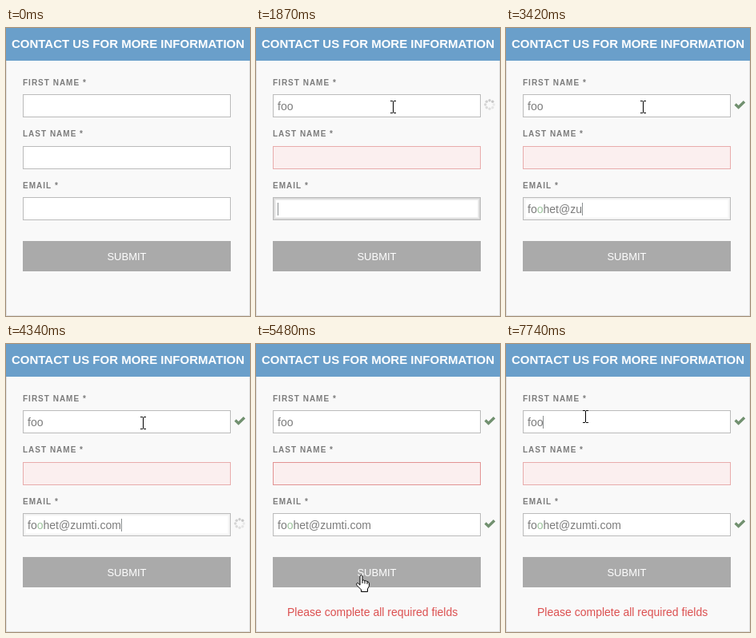
An HTML page with a canvas that plays this animation: 305x361 px, repeating every 8000 ms.

```html
<!DOCTYPE html>
<html lang="en">
<head>
<meta charset="utf-8">
<title>Contact form</title>
<style>
html, body { margin: 0; width: 100%; height: 100%; overflow: hidden; background: #f9f9f9; }
canvas { display: block; width: 305px; height: 361px; }
</style>
</head>
<body>
<canvas id="stage"></canvas>
<script>
const W = 305, H = 361, LOOP = 8000;
const FONT = '"Liberation Sans", Arial, sans-serif';
const canvas = document.getElementById('stage');
const ctx = canvas.getContext('2d');
const dpr = window.devicePixelRatio || 1;
canvas.width = W * dpr;
canvas.height = H * dpr;

const FIRST = 83, LAST = 148, MAIL = 212;
const NAME = 'foo', ADDRESS = 'foohet@zumti.com';
// Times at which each next character appears
const NAME_KEYS = [1080, 1160, 1310];
const MAIL_KEYS = [2170, 2250, 2410, 2490, 2560, 2640, 2960, 3340, 3420,
  3570, 3570, 3800, 3960, 4110, 4190, 4270];

// Pointer moves: first step, last step, step count, then a quadratic curve
const MOVES = [
  [70, 620, 8, 182, 268, 143, 185, 171, 99],
  [4420, 4880, 7, 171, 99, 171, 135, 161, 181],
  [4950, 5260, 5, 161, 181, 142, 250, 131, 290],
  [6890, 7120, 4, 131, 290, 112, 150, 97, 81],
  [7270, 7420, 3, 97, 81, 98, 76, 99, 91]
];

function box(x, y, w, h, fill) {
  ctx.fillStyle = fill;
  ctx.fillRect(x, y, w, h);
}

function text(str, x, y, size, color, opt = {}) {
  ctx.font = `${opt.bold ? 'bold ' : ''}${size}px ${FONT}`;
  ctx.letterSpacing = (opt.space || 0) + 'px';
  ctx.textAlign = opt.align || 'left';
  ctx.fillStyle = color;
  ctx.fillText(str, x, y);
  return ctx.measureText(str).width;
}

function field(y, border, fill, glow = 0) {
  box(21, y, 260, 29, border);
  box(22, y + 1, 258, 27, fill);
  for (let i = 0; glow && i < 3; i++) {
    ctx.strokeStyle = `rgba(0,0,0,${glow * (0.16 - i * 0.05)})`;
    ctx.lineWidth = 1;
    ctx.strokeRect(22.5 + i, y + 1.5 + i, 257 - 2 * i, 26 - 2 * i);
  }
}

function caret(x, y) {
  box(Math.round(x), y + 7, 1, 16, '#8a8f90');
}

function spinner(y, t) {
  const head = Math.floor(t / 78) % 8;
  for (let i = 0; i < 8; i++) {
    const a = i * Math.PI / 4, age = (head - i + 8) % 8;
    const g = 198 + age * 5;
    ctx.fillStyle = `rgb(${g},${g},${g})`;
    ctx.beginPath();
    ctx.arc(292 + 5.3 * Math.cos(a), y + 13 + 5.3 * Math.sin(a), 1.7, 0, 7);
    ctx.fill();
  }
}

function check(y) {
  ctx.strokeStyle = '#71906f';
  ctx.lineWidth = 3.4;
  ctx.lineJoin = 'miter';
  ctx.beginPath();
  ctx.moveTo(286.6, y + 12.6);
  ctx.lineTo(290.6, y + 16.4);
  ctx.lineTo(298, y + 9.2);
  ctx.stroke();
}

function outline(path) {
  ctx.lineWidth = 1;
  ctx.lineJoin = 'round';
  ctx.fillStyle = '#fff';
  ctx.strokeStyle = '#000';
  ctx.fill(path);
  ctx.stroke(path);
}

const ARROW = new Path2D('M.5 .5V16.5L4.2 13L6.8 18.5L9 17.5L6.5 12H11.5Z');
const HAND = new Path2D('M5 2Q6.5-.8 8 2V7.5Q9.5 6 11 8Q12.5 6.8 14 9' +
  'Q16 8.5 16.4 11V14.5L14.5 18V21.5H6.5V19L1.2 13.6Q-.3 10.4 2.5 10.8L5 13.2Z' +
  'M8 7.5V11M11 8V11.5M14 9V12');

function pointer(x, y) {
  const inside = (top, h) => x > 21 && x < 281 && y > top && y < top + h;
  x = Math.round(x);
  y = Math.round(y);
  ctx.save();
  ctx.translate(x, y);
  if (inside(267, 38)) {
    ctx.translate(-6, -1);
    outline(HAND);
  } else if ([FIRST, LAST, MAIL].some(top => inside(top, 29))) {
    box(0, -7, 1, 14, '#000');
    for (const dy of [-8, 7]) {
      box(-3, dy, 3, 1, '#000');
      box(1, dy, 3, 1, '#000');
    }
  } else {
    outline(ARROW);
  }
  ctx.restore();
}

function pointerAt(t) {
  let pos = null;
  for (const [t0, t1, n, x0, y0, cx, cy, x1, y1] of MOVES) {
    if (t < t0) break;
    const k = Math.min(n, 1 + Math.floor((t - t0) / (t1 - t0) * (n - 1) + 0.02));
    const u = k / n, v = 1 - u;
    const mix = (a, b, c) => v * v * a + 2 * u * v * b + u * u * c;
    pos = [mix(x0, cx, x1), mix(y0, cy, y1)];
  }
  return pos;
}

// Last value whose start time has passed
function step(t, list) {
  let value = list[0][1];
  for (const [at, v] of list) if (t >= at) value = v;
  return value;
}

const typed = (str, keys, t) => str.slice(0, keys.filter(k => t >= k).length);

function draw(t) {
  ctx.setTransform(dpr, 0, 0, dpr, 0, 0);
  box(0, 0, W, H, '#e0e0e0');
  box(1, 0, W - 2, H - 1, '#f9f9f9');
  box(0, 0, W, 41, '#6a9fca');
  text('CONTACT US FOR MORE INFORMATION', 152.5, 25, 15, '#fff', { bold: true, align: 'center' });

  const label = { bold: true, space: 1 };
  text('FIRST NAME *', 21, 72, 10, '#7c7c7c', label);
  text('LAST NAME *', 21, 136, 10, '#7c7c7c', label);
  text('EMAIL *', 21, 201, 10, '#7c7c7c', label);

  field(FIRST, '#bbb', '#fff', step(t, [[0, 0], [770, 1], [1080, 0.65], [1160, 0.35], [1630, 0]]));
  const edge = step(t, [[0, '#bbb'], [1710, '#e2b4b4'], [1790, '#e8acac'], [5480, '#e29393'],
    [5570, '#d66a6a'], [5650, '#c94545'], [6500, '#cc4e4e'], [6580, '#dc8080'], [6660, '#e8acac']]);
  const fill = step(t, [[0, '#fff'], [1710, '#fdf5f5'], [1790, '#fbefef']]);
  field(LAST, edge, fill, t >= 1630 && t < 1790 ? 1 : 0);
  field(MAIL, '#bbb', '#fff', step(t, [[0, 0], [1790, 1], [2170, 0.65], [2250, 0.35], [4800, 0]]));

  const name = typed(NAME, NAME_KEYS, t);
  const nameEnd = 27 + text(name, 27, 103, 14, '#7c7c7c');
  if (t >= 770 && t < 1630 || t >= 7740) caret(nameEnd, FIRST);
  if (t >= 1630 && t < 1790) caret(27, LAST);

  // The third letter of the address is tinted green
  const mail = typed(ADDRESS, MAIL_KEYS, t);
  let x = 27;
  x += text(mail.slice(0, 2), x, 232, 14, '#7c7c7c');
  x += text(mail.slice(2, 3), x, 232, 14, '#9cc49c');
  x += text(mail.slice(3), x, 232, 14, '#7c7c7c');
  if (t >= 1790 && t < 4800) caret(x, MAIL);

  if (t >= 2330) check(FIRST);
  else if (t >= 1630) spinner(FIRST, t);
  if (t >= 4800) check(MAIL);
  else if (t >= 4270) spinner(MAIL, t);

  box(21, 267, 260, 38, '#aaa');
  text('SUBMIT', 151, 291, 13, '#fff', { align: 'center' });
  if (t >= 5480) text('Please complete all required fields', 39, 341, 14, '#dc5050');

  const pos = pointerAt(t);
  if (pos) pointer(...pos);
}

const start = performance.now();
function tick() {
  draw((performance.now() - start) % LOOP);
  requestAnimationFrame(tick);
}
tick();
</script>
</body>
</html>
```
